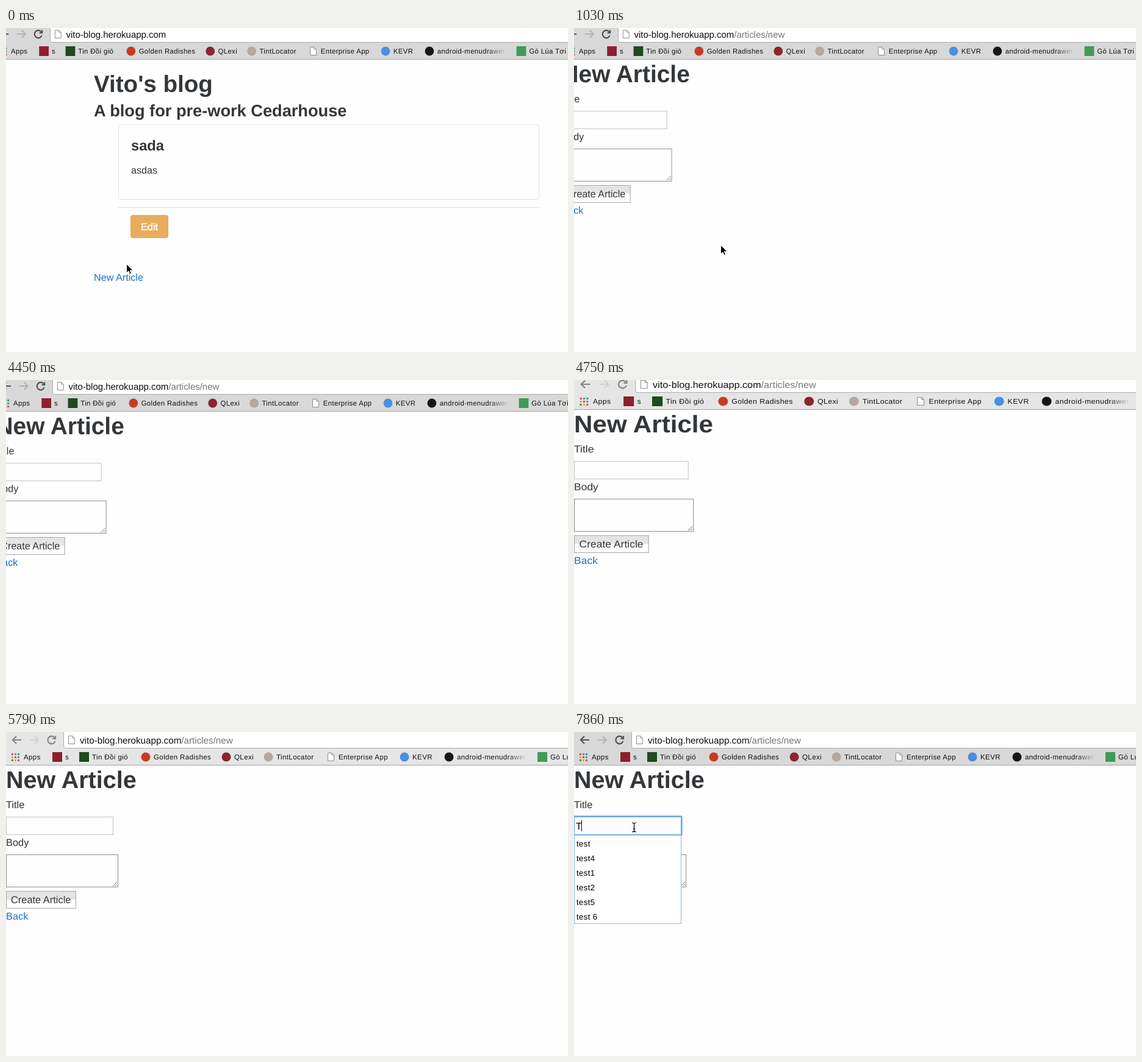
Write an HTML page that moves like this. It is 921x532 px and loops after 8 s.

```html
<!DOCTYPE html>
<html lang="en">
<head>
<meta charset="utf-8">
<title>Blog walkthrough</title>
<style>
html, body { margin: 0; width: 100%; height: 100%; overflow: hidden; background: #fefefe; }
svg { display: block; font: 16.4px "Liberation Sans", Arial, sans-serif; fill: #333; text-rendering: geometricPrecision; }
.h { font-weight: bold; fill: #34373a; }
.link { fill: #1f6fc6; }
.line { fill: none; stroke: #c4c4c4; }
#bar { fill: #d8d8d8; }
#nav { fill: none; stroke: #505050; stroke-width: 2.2; }
#nav .off { stroke: #b4b4b4; }
.idle #bar { fill: #e5e5e5; }
.idle #nav { stroke: #858585; }
.idle #nav .off { stroke: #d2d2d2; }
#marks { font-size: 11.5px; letter-spacing: .4px; fill: #111; }
#menu { font-size: 13.3px; letter-spacing: .3px; fill: #000; }
#cursor path { fill: #000; stroke: #fff; stroke-width: 1; }
</style>
</head>
<body>
<svg id="stage" width="921" height="532" viewBox="0 0 921 532">
  <defs>
    <linearGradient id="fade" gradientUnits="userSpaceOnUse" x1="822" x2="855">
      <stop stop-color="#111"/><stop offset="1" stop-color="#111" stop-opacity="0"/>
    </linearGradient>
    <g id="sheet" fill="#fff" stroke="#8c8c8c">
      <path d="M.5 .5H7L10.5 4V13.5H.5Z"/><path d="M7 .5V4H10.5" fill="none"/>
    </g>
  </defs>

  <g id="home">
    <text class="h" x="144" y="105" font-size="38.6">Vito's blog</text>
    <text class="h" x="144" y="145" font-size="27.2">A blog for pre-work Cedarhouse</text>
    <rect class="line" x="184.5" y="158.5" width="689" height="123" rx="4" style="stroke:#e2e2e2"/>
    <text class="h" x="205" y="201" font-size="23.7">sada</text>
    <text x="205" y="239" font-size="16.1">asdas</text>
    <path class="line" d="M184 294.5H874" style="stroke:#dedede"/>
    <rect x="204" y="307" width="62" height="38" rx="4" fill="#e8ac5a"/>
    <text x="221" y="332" font-size="16.3" fill="#fff" stroke="#fff" stroke-width=".5">Edit</text>
    <text id="newLink" class="link" x="144" y="415" font-size="16.2">New Article</text>
  </g>

  <g id="view">
    <g id="form">
      <text class="h" x="0" y="92" font-size="39.5">New Article</text>
      <text x="0" y="125">Title</text>
      <rect class="line" x=".5" y="139.5" width="175" height="29"/>
      <text x="0" y="187">Body</text>
      <rect class="line" x=".5" y="201.5" width="183" height="53" style="stroke:#8e8e8e"/>
      <path class="line" d="M175 253L182 246M179 253L182 250" style="stroke:#777"/>
      <rect x="0" y="261" width="115" height="14" fill="#e4e4e4"/>
      <rect class="line" x=".5" y="261.5" width="114" height="28" style="stroke:#a6a6a6"/>
      <text x="8" y="281">Create Article</text>
      <text class="link" x="0" y="308">Back</text>
    </g>
    <g id="focus">
      <rect class="line" x="0" y="139" width="176" height="30" rx="2" style="stroke:#b9d8f8;stroke-width:5"/>
      <rect x="0" y="139" width="176" height="30" fill="#fff" stroke="#62a5ea" stroke-width="2"/>
    </g>
    <g id="menu">
      <text x="3" y="160" font-size="16" letter-spacing="0">T</text>
      <rect x=".5" y="169.5" width="175" height="145" fill="#fff" stroke="#8fbbe3"/>
    </g>
    <rect id="caret" y="145" width="1" height="18" fill="#000"/>

    <rect id="bar" x="-10" y="-10" width="1000" height="64"/>
    <path d="M-10 54.5H990" stroke="#a3a3a3"/>
    <g id="nav">
      <path d="M25 13H11M17 7L11 13L17 19"/>
      <path class="off" d="M39 13H53M47 7L53 13L47 19"/>
      <path d="M79.6 9.5A6.2 6.2 0 1 0 80.5 15"/>
      <path d="M81 6.5V11H76.5"/>
    </g>
    <rect x="94.5" y="-20" width="900" height="46.5" rx="3" fill="#fff" stroke="#adadad"/>
    <use href="#sheet" x="102" y="6"/>
    <text x="121" y="19" font-size="15.2" fill="#111">vito-blog.herokuapp.com<tspan id="path" fill="#777">/articles/new</tspan></text>
    <rect id="hover" x="215" y="30" width="129" height="22" rx="3" fill="#dfdfdf"/>
    <g id="marks"></g>
  </g>

  <g id="cursor">
    <path id="arrow" d="M0 0V14.5L3.4 11.4L5.6 16.5L8 15.5L5.8 10.5H10.5Z"/>
    <path id="hand" d="M-2 1Q0 -1 2 1V7Q4 5 5 8Q7 6 8 9Q10 8 10 10V14Q9 17 8 20H-1Q-3 16 -6 12Q-5 9 -2 12Z" style="fill:#fff;stroke:#000"/>
    <path id="beam" d="M-3.5 -7.5Q0 -7.5 0 -5.5Q0 -7.5 3.5 -7.5M0 -5.5V5.5M-3.5 7.5Q0 7.5 0 5.5Q0 7.5 3.5 7.5M-2 2.5H2" style="fill:none;stroke:#000;stroke-width:1.2"/>
  </g>
</svg>
<script>
const $ = id => document.getElementById(id);
const show = (id, on) => $(id).style.display = on ? '' : 'none';

function add(parent, tag, attrs, label) {
  const el = document.createElementNS('http://www.w3.org/2000/svg', tag);
  for (const key in attrs) el.setAttribute(key, attrs[key]);
  if (label) el.textContent = label;
  $(parent).append(el);
}

// Bookmarks: label, text x, icon kind, icon colour
const bookmarks = [
  ['Apps', 29, 'grid'],
  ['s', 97, 'square', '#8e1f2f'],
  ['Tin Đồi gió', 141, 'square', '#1d4a1f'],
  ['Golden Radishes', 242, 'circle', '#c93a25'],
  ['QLexi', 374, 'circle', '#8b2530'],
  ['TintLocator', 443, 'circle', '#b5a79d'],
  ['Enterprise App', 545, 'sheet'],
  ['KEVR', 666, 'circle', '#4a8fe0'],
  ['android-menudrawer', 739, 'circle', '#161616'],
  ['Gò Lúa Tơi |', 892, 'square', '#3f9b53']
];
for (const [label, x, icon, fill] of bookmarks) {
  const left = x - 21;
  if (icon === 'grid') {
    const tints = ['#dd5144', '#e8a33a', '#3f9b53', '#4a8fe0'];
    for (let i = 0; i < 9; i++)
      add('marks', 'rect', { x: 9 + i % 3 * 5, y: 35 + (i / 3 | 0) * 5, width: 3, height: 3, fill: tints[i * 3 % 4] });
  } else if (icon === 'sheet') add('marks', 'use', { href: '#sheet', x: x - 18, y: 34 });
  else if (icon === 'circle') add('marks', 'circle', { cx: left + 8, cy: 41, r: 7.5, fill });
  else add('marks', 'rect', { x: left, y: 33, width: 16, height: 16, fill });
  add('marks', 'text', { x, y: 45, ...(x === 739 && { fill: 'url(#fade)' }) }, label);
}
['test', 'test4', 'test1', 'test2', 'test5', 'test 6'].forEach((word, i) =>
  add('menu', 'text', { x: 4, y: 188 + 24 * i }, word));

// Time, horizontal scale, x, y
const views = [
  [0, .984, -20.5, -3], [4450, .984, -16.5, -3], [4600, 1.03, -6, -5],
  [4750, 1.067, 0, -6], [4900, 1.045, 0, -4], [5040, 1.015, 0, -1], [5190, 1, 0, 0]
];
// Time, pointer shape, x, y
const pointer = [
  [0, 'arrow', 197.5, 387.5], [140, 'hand', 200, 401], [290, 'hand', 202, 404],
  [890, 'arrow', 212, 388], [1030, 'arrow', 240.5, 356.5], [1180, 'arrow', 258, 322],
  [1330, 'arrow', 267, 298], [1480, 'arrow', 268, 287], [1920, 'arrow', 265, 240],
  [2070, 'arrow', 262, 140], [2220, 'arrow', 262, 34], [2370, '', 0, 0],
  [5940, 'arrow', 230, 35], [6080, 'arrow', 160, 118], [6230, 'beam', 112, 166],
  [6370, 'beam', 98.5, 156.5]
];
const current = (steps, t) => steps.findLast(step => step[0] <= t);

function draw(now) {
  const t = now % 8000;
  const within = (from, to) => t >= from && t < to;
  const [, scale, x, y] = current(views, t);
  $('view').setAttribute('transform', `matrix(${scale} 0 0 1 ${x} ${y})`);

  const [, shape, px, py] = current(pointer, t);
  $('cursor').setAttribute('transform', `translate(${px} ${py})`);
  for (const id of ['arrow', 'hand', 'beam']) show(id, id === shape);

  $('newLink').style.textDecoration = within(140, 890) ? 'underline' : 'none';
  show('home', t < 1030);
  show('form', t >= 1030);
  show('path', t >= 1030);
  show('hover', within(2220, 2370));
  $('stage').classList.toggle('idle', within(4600, 6670));
  show('focus', t >= 7110);
  show('menu', t >= 7860);
  show('caret', within(7110, 7560) || t >= 7860);
  $('caret').setAttribute('x', t >= 7860 ? 12 : 3);
  requestAnimationFrame(draw);
}
requestAnimationFrame(draw);
</script>
</body>
</html>
```
